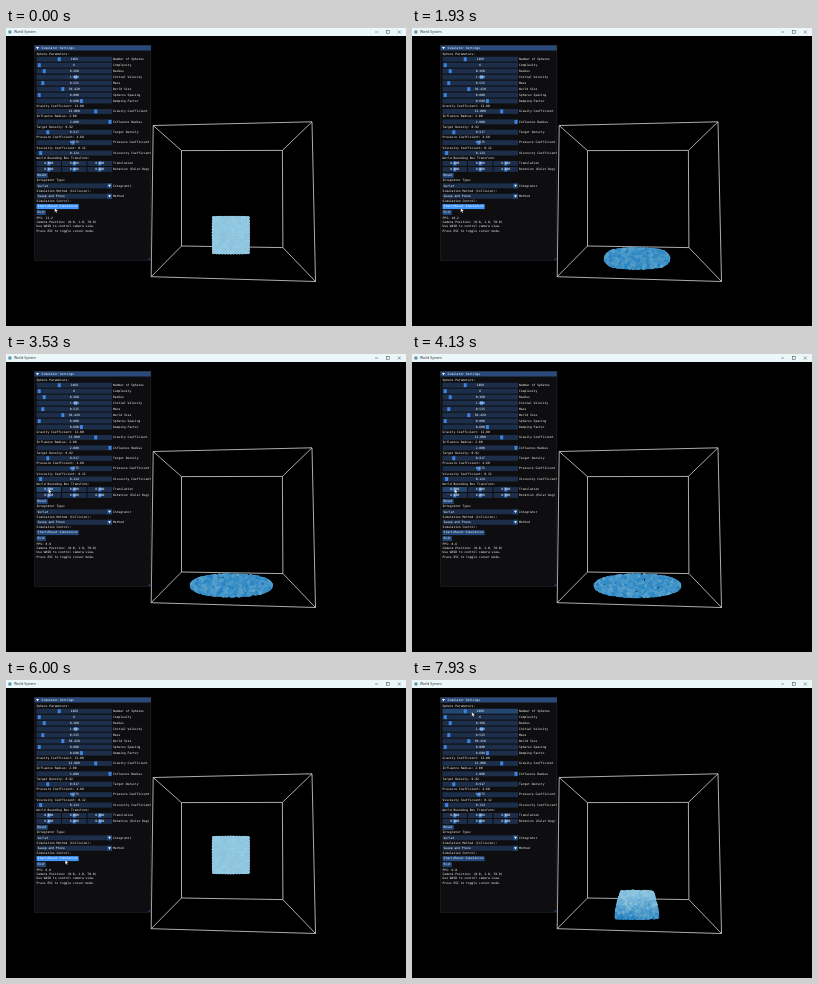
Animation, 400 px wide and 298 px high, one loop 8000 ms. Source, as an HTML page with a canvas:

```html
<!DOCTYPE html>
<html lang="en">
<head>
<meta charset="utf-8">
<title>World System</title>
<style>
  html, body { margin: 0; width: 100%; height: 100%; overflow: hidden; background: #000; }
  canvas { display: block; width: 400px; height: 298px; }
</style>
</head>
<body>
<canvas id="stage"></canvas>
<script>
const LOOP = 8000, FRAME = 200 / 3, RESET = 5600, RELEASE = 6100;
const canvas = document.getElementById('stage');
const ctx = canvas.getContext('2d');
const ratio = Math.max(1, window.devicePixelRatio || 1);
canvas.width = 400 * ratio;
canvas.height = 298 * ratio;
ctx.scale(ratio, ratio);

const clamp = (v, lo, hi) => Math.min(hi, Math.max(lo, v));
const mix = (a, b, k) => a + (b - a) * k;
const settle = (k, tau) => 1 - Math.exp(-k / tau);

function rect(x, y, w, h, color) {
  ctx.fillStyle = color;
  ctx.fillRect(x, y, w, h);
}
function path(points, close) {
  ctx.beginPath();
  points.forEach(([x, y]) => ctx.lineTo(x, y));
  if (close) ctx.closePath();
}
function stroke(points, close) {
  path(points, close);
  ctx.stroke();
}
function fill(points, color) {
  path(points, true);
  ctx.fillStyle = color;
  ctx.fill();
}

function drawTitleBar() {
  rect(0, 0, 400, 8, '#ebf7f9');
  rect(2.4, 2.5, 3, 3, '#5a8fa8');
  ctx.font = '3.4px "Open Sans", sans-serif';
  ctx.textAlign = 'left';
  ctx.textBaseline = 'middle';
  ctx.fillStyle = '#222';
  ctx.fillText('World System', 8, 4.1);
  ctx.strokeStyle = '#444';
  ctx.lineWidth = .5;
  stroke([[369, 4], [372.2, 4]]);
  ctx.strokeRect(380.4, 2.6, 2.8, 2.8);
  stroke([[391.8, 2.5], [394.8, 5.5]]);
  stroke([[394.8, 2.5], [391.8, 5.5]]);
}

function drawBox() {
  const front = [[147.2, 97.5], [306, 93.8], [309.5, 253.5], [145.2, 248.7]];
  const back = [[175.5, 122.6], [276.4, 122.4], [276.9, 219.6], [175.5, 218]];
  ctx.strokeStyle = '#d8d8d8';
  ctx.lineWidth = .8;
  stroke(front, true);
  stroke(back, true);
  front.forEach((p, i) => stroke([p, back[i]]));
}

let seed = 7;
function random() {
  seed = (seed * 16807) % 2147483647;
  return seed / 2147483647;
}
const SIDE = 13, LAYERS = 6;
const dots = Array.from({ length: SIDE * SIDE * LAYERS }, (_, n) => ({
  u: (n % SIDE) / (SIDE - 1) * 2 - 1,
  v: (Math.floor(n / SIDE) % SIDE) / (SIDE - 1) * 2 - 1,
  depth: 1 - Math.floor(n / SIDE / SIDE) / (LAYERS - 1),
  du: random() - .5, dv: random() - .5,
  tone: random() - .5, phase: random() * 6.28, order: random()
}));
const shuffled = dots.slice().sort((a, b) => a.order - b.order);

// Free fall onto the floor, then collapse and slow spreading.
function fluidPose(t) {
  const s = (t < RESET ? t + LOOP - 500 - RELEASE + RELEASE - 6100 : Math.max(0, t - RELEASE)) / 1000;
  const k = Math.max(0, s - 1.67);
  const ry = k ? 10.6 + 8.9 * Math.exp(-4 * k) + .5 * k : 19.4;
  const bottom = k ? 240 + 1.1 * k : 194.4 + 16.4 * s * s;
  return {
    cx: 224.7 + .2 * k, cy: bottom - ry, rx: 19 + 36 * settle(k, 3.3), ry,
    round: .06 + .94 * settle(k, 1.2),
    taper: 1.6 * k * Math.exp(-3.5 * k),
    blue: .7 * settle(k, .25)
  };
}

function drawFluid(t) {
  const { cx, cy, rx, ry, round, taper, blue } = fluidPose(t);
  const r = 1.75;
  const tick = Math.floor(t / (2 * FRAME));
  const loose = Math.min(1, (round - .06) * 1.5 + taper * 2);
  for (const d of round > .3 ? shuffled : dots) {
    const shrink = 1 - .05 * d.depth * (1 - round);
    const sway = .05 * Math.sin(d.phase + tick * .6) * loose;
    const u = clamp(d.u + (d.du * .34 + sway) * loose, -1, 1) * shrink;
    const v = clamp(d.v + (d.dv * .34 - sway) * loose, -1, 1) * shrink;
    const x = mix(u, u * Math.sqrt(1 - v * v / 2), round) * (1 + taper * v);
    const y = mix(v, v * Math.sqrt(1 - u * u / 2), round);
    const seam = d.u > .2 ? .35 * (1 - round) : 0;
    const flicker = .1 * Math.sin(d.phase * 3 + tick * .35);
    const k = clamp(blue + taper * 3 * v + (d.tone + flicker) * Math.min(.55, blue * 2), 0, 1);
    const shade = 1 - .1 * d.depth * (1 - round) + d.tone * .05;
    const rgb = [mix(145, 32, k), mix(199, 126, k), mix(224, 190, k)].map(c => Math.round(c * shade));
    ctx.fillStyle = `rgb(${rgb})`;
    ctx.beginPath();
    ctx.arc(cx + x * (rx - r) + seam, cy + y * (ry - r), r, 0, 6.2832);
    ctx.fill();
  }
}

// The panel is laid out top to bottom in units of its own pixel size.
const U = .26, LEFT = 30.5, WIDTH = 75.5, GAP = 4 * U, BAR = 19 * U, LINE = 13 * U;
const COLORS = {
  panel: '#0e0e10', border: '#34343c', title: '#294a7a', field: '#1c2e49',
  fieldHover: '#24476f', button: '#23487a', hot: '#4296fa', grab: '#3d85e0'
};

function label(str, x, y, align = 'left') {
  ctx.font = '3.02px "DejaVu Sans Mono", monospace';
  ctx.textAlign = align;
  ctx.textBaseline = 'middle';
  ctx.fillStyle = '#fff';
  ctx.fillText(str, x, y);
}

function drawPanel(t, [mx, my]) {
  let top = 24.3;
  const next = height => {
    const y = top + height / 2;
    top += height + GAP;
    return y;
  };
  const field = (x, y, w, color, hover) => {
    const over = mx >= x && mx <= x + w && Math.abs(my - y) <= BAR / 2;
    rect(x, y - BAR / 2, w, BAR, over ? hover : color);
  };
  const track = (x, y, w, value, at) => {
    field(x, y, w, COLORS.field, COLORS.fieldHover);
    rect(x + 2 + at * (w - 4) - 1.5, y - 1.95, 3, 3.9, COLORS.grab);
    label(value, x + w / 2, y, 'center');
  };
  const caption = (name, y) => label(name, LEFT + WIDTH + GAP, y);
  const note = str => label(str, LEFT, next(LINE));
  const slider = (name, value, at) => {
    const y = next(BAR);
    track(LEFT, y, WIDTH, value, at);
    caption(name, y);
  };
  const vector = name => {
    const y = next(BAR), w = (WIDTH - 2 * GAP) / 3;
    for (let i = 0; i < 3; i++) track(LEFT + i * (w + GAP), y, w, '0.000', .5);
    caption(name, y);
  };
  const button = name => {
    const y = next(BAR), w = (name.length * 7 + 8) * U;
    field(LEFT, y, w, COLORS.button, COLORS.hot);
    label(name, LEFT + w / 2, y, 'center');
  };
  const combo = (name, value) => {
    const y = next(BAR), x = LEFT + WIDTH - BAR;
    field(LEFT, y, WIDTH, COLORS.field, COLORS.fieldHover);
    rect(x, y - BAR / 2, BAR, BAR, COLORS.button);
    fill([[x + 1, y - 1], [x + 3.9, y - 1], [x + 2.45, y + 1.3]], '#fff');
    label(value, LEFT + GAP, y);
    caption(name, y);
  };

  rect(28.5, 17.3, 116.5, 215, COLORS.panel);
  rect(28.5, 17.3, 116.5, 5.2, COLORS.title);
  fill([[30, 18.9], [33, 18.9], [31.5, 21.3]], '#fff');
  label('Simulator Settings', 35.5, 20.1);
  ctx.strokeStyle = COLORS.border;
  ctx.lineWidth = .4;
  ctx.strokeRect(28.6, 17.4, 116.3, 214.8);
  fill([[144.7, 229], [144.7, 232], [141.7, 232]], '#1c3a60');

  note('Sphere Parameters:');
  slider('Number of Spheres', '1469', .29);
  slider('Complexity', '6', .01);
  slider('Radius', '0.360', .08);
  slider('Initial Velocity', '1.000', .52);
  slider('Mass', '0.525', .06);
  slider('World Size', '50.420', .34);
  slider('Spheres Spacing', '0.000', .01);
  slider('Damping Factor', '0.600', .6);
  note('Gravity Coefficient: 12.00');
  slider('Gravity Coefficient', '12.000', .8);
  note('Influence Radius: 2.00');
  slider('Influence Radius', '2.000', 1);
  note('Target Density: 0.92');
  slider('Target Density', '0.917', .13);
  note('Pressure Coefficient: 4.60');
  slider('Pressure Coefficient', '4.575', .48);
  note('Viscosity Coefficient: 0.12');
  slider('Viscosity Coefficient', '0.124', .03);
  note('World Bounding Box Transform:');
  vector('Translation');
  vector('Rotation (Euler Deg)');
  button('Reset');
  note('Integrator Type:');
  combo('Integrator', 'Verlet');
  note('Simulation Method (Collision):');
  combo('Method', 'Sweep and Prune');
  note('Simulation Control:');
  button('Start/Reset Simulation');
  button('Exit');
  const second = Math.floor(t / 500) / 2;
  note('FPS: ' + (t < RESET ? 11.2 - .65 * second : 6).toFixed(1));
  note('Camera Position: (0.0, 1.0, 70.0)');
  note('Use WASD to control camera view.');
  note('Press ESC to toggle cursor mode.');
}

const MOVES = [
  { from: 2000, to: 2600, x: 42.5, y: 124 },
  { from: 2700, to: 2900, x: 42.5, y: 134.8 },
  { from: 4450, to: 5000, x: 59.2, y: 179.8 },
  { from: 6500, to: 7400, x: 59.8, y: 32 }
];
function pointerAt(t) {
  return MOVES.reduce(([x, y], move) => {
    const k = clamp((t - move.from) / (move.to - move.from), 0, 1);
    const eased = k * k * (3 - 2 * k);
    return [mix(x, move.x, eased), mix(y, move.y, eased)];
  }, [48.7, 179.8]);
}
function drawPointer([x, y]) {
  const arrow = [[0, 0], [0, 4.5], [1, 3.6], [1.7, 5.1], [2.4, 4.8], [1.8, 3.3], [3.2, 3.2]];
  fill(arrow.map(([dx, dy]) => [x + dx, y + dy]), '#fff');
  ctx.strokeStyle = '#000';
  ctx.lineWidth = .25;
  ctx.stroke();
}

const HOVER_LAG = 200;
const start = performance.now();
function render(now) {
  const elapsed = Math.max(0, now - start) % LOOP;
  const t = Math.floor((elapsed + 5) / FRAME) * FRAME % LOOP;
  rect(0, 0, 400, 298, '#000');
  drawTitleBar();
  drawBox();
  drawFluid(t);
  drawPanel(t, pointerAt(t - HOVER_LAG));
  drawPointer(pointerAt(t));
  requestAnimationFrame(render);
}
render(start);
</script>
</body>
</html>
```
